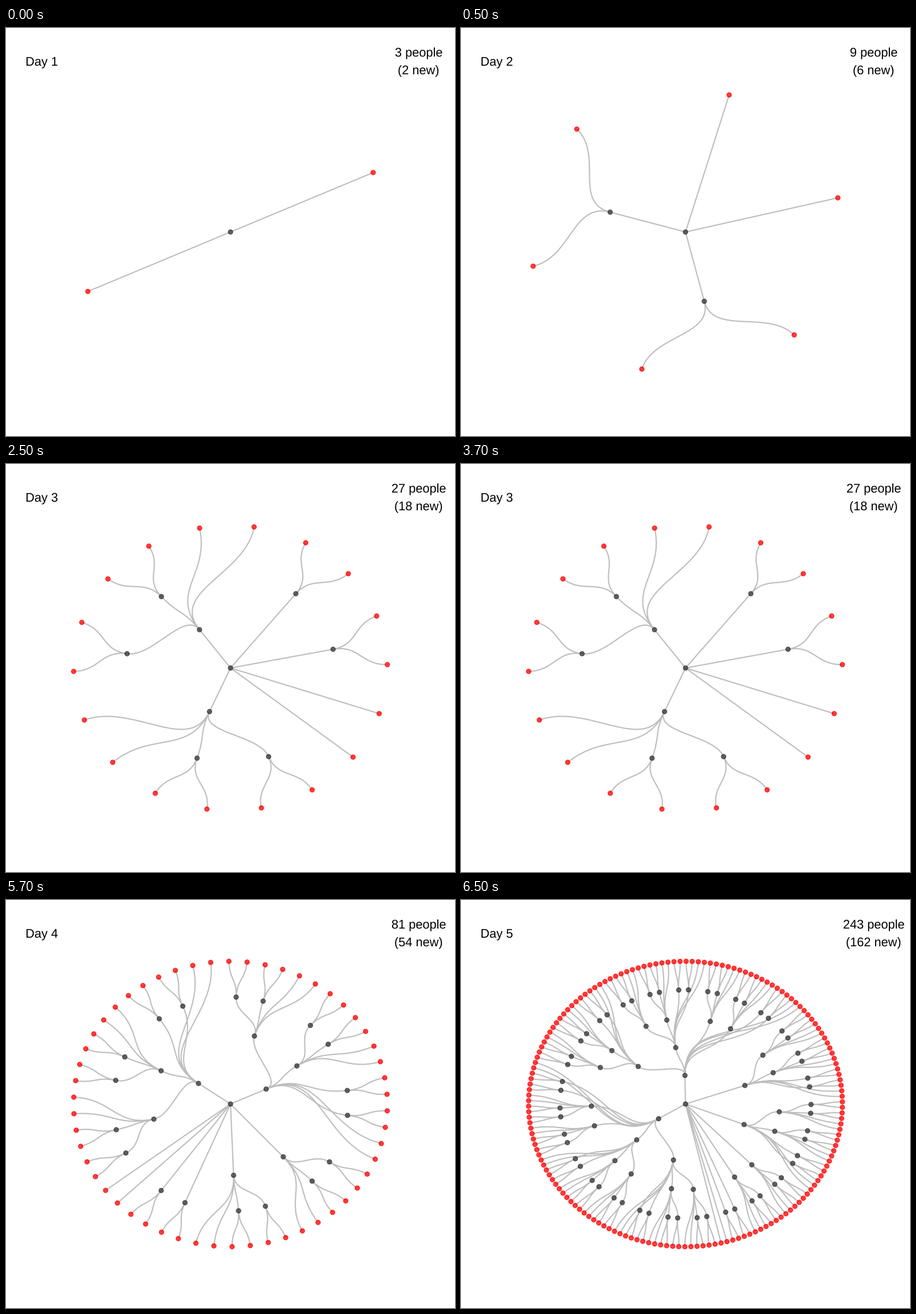
Write a matplotlib script that moves like this. It is 784 px wide and 714 px high and loops after 8 s.

```python
import math

import matplotlib.pyplot as plt
from matplotlib.animation import FuncAnimation
from matplotlib.patches import PathPatch
from matplotlib.path import Path

WIDTH, HEIGHT, DPI = 784, 714, 64
CENTER = (392, 357)
RADII = (274, 249.75)
PX = 72 / DPI  # points per pixel
STEP_MS = 500
DAY_STARTS = [0, 500, 2500, 4500, 6500]
FIRST_LEAF_ANGLE = [24.62, 13.85, 321.36, 217.25, 283.1]
EDGE_COLOR = "#bebebe"
OLD_COLOR = (0.2, 0.2, 0.2, 0.75)
NEW_COLOR = (1, 0, 0, 0.75)

plt.rcParams["font.family"] = "Liberation Sans"
plt.rcParams["text.hinting"] = "none"

fig = plt.figure(figsize=(WIDTH / DPI, HEIGHT / DPI), dpi=DPI, facecolor="white")
ax = fig.add_axes([0, 0, 1, 1])
ax.set(xlim=(0, WIDTH), ylim=(HEIGHT, 0))
ax.axis("off")


def polar(radius, angle):
    return (CENTER[0] + RADII[0] * radius * math.cos(angle),
            CENTER[1] - RADII[1] * radius * math.sin(angle))


def grow(height, first_leaf, nodes, edges):
    """Lay out a person infected `height` days ago; return (slot, leaf count)."""
    if height == 0:
        nodes.append((0, first_leaf))
        return first_leaf, 1
    slots, count = [], 0
    for child in range(height):
        for _ in range(2):
            slot, leaves = grow(child, first_leaf + count, nodes, edges)
            slots.append((child, slot))
            count += leaves
    middle = (slots[0][1] + slots[-1][1]) / 2
    nodes.append((height, middle))
    edges.extend(((height, middle), child) for child in slots)
    return middle, count


def build_day(day):
    nodes, edges = [], []
    _, leaves = grow(day, 0, nodes, edges)
    start = math.radians(FIRST_LEAF_ANGLE[day - 1])

    def place(node):
        return 1 - node[0] / day, start + 2 * math.pi * node[1] / leaves

    verts, codes = [], []
    for parent, child in edges:
        (r0, a0), (r1, a1) = place(parent), place(child)
        if parent[0] == day:
            verts += [CENTER, polar(r1, a1)]
            codes += [Path.MOVETO, Path.LINETO]
        else:
            mid = (r0 + r1) / 2
            verts += [polar(r0, a0), polar(mid, a0), polar(mid, a1), polar(r1, a1)]
            codes += [Path.MOVETO] + [Path.CURVE4] * 3
    lines = PathPatch(Path(verts, codes), fill=False, edgecolor=EDGE_COLOR,
                      linewidth=2.13 * PX, capstyle="butt", snap=False, zorder=1)
    ax.add_patch(lines)

    nodes.sort(key=lambda node: -node[0])
    xs, ys = zip(*(polar(*place(node)) for node in nodes))
    colors = [OLD_COLOR if node[0] else NEW_COLOR for node in nodes]
    dots = ax.scatter(xs, ys, s=(7.8 * PX) ** 2, c=colors, edgecolors=colors,
                      linewidths=1.42 * PX, zorder=2)
    return [lines, dots]


def label(x, baseline):
    return ax.text(x, baseline, "", size=21.8 * PX, color="black",
                   ha="center", va="baseline")


day_label = label(62.6, 65.8)
people_label = label(720.7, 50.6)
new_label = label(720.7, 81.3)
trees = [build_day(day) for day in range(1, 6)]


def draw(frame):
    day = sum(frame * STEP_MS >= t for t in DAY_STARTS)
    for number, artists in enumerate(trees, 1):
        for artist in artists:
            artist.set_visible(number == day)
    day_label.set_text(f"Day {day}")
    people_label.set_text(f"{3 ** day} people")
    new_label.set_text(f"({2 * 3 ** (day - 1)} new)")
    return []


anim = FuncAnimation(fig, draw, frames=16, interval=STEP_MS, repeat=True,
                     repeat_delay=0, blit=False)
plt.show()
```
